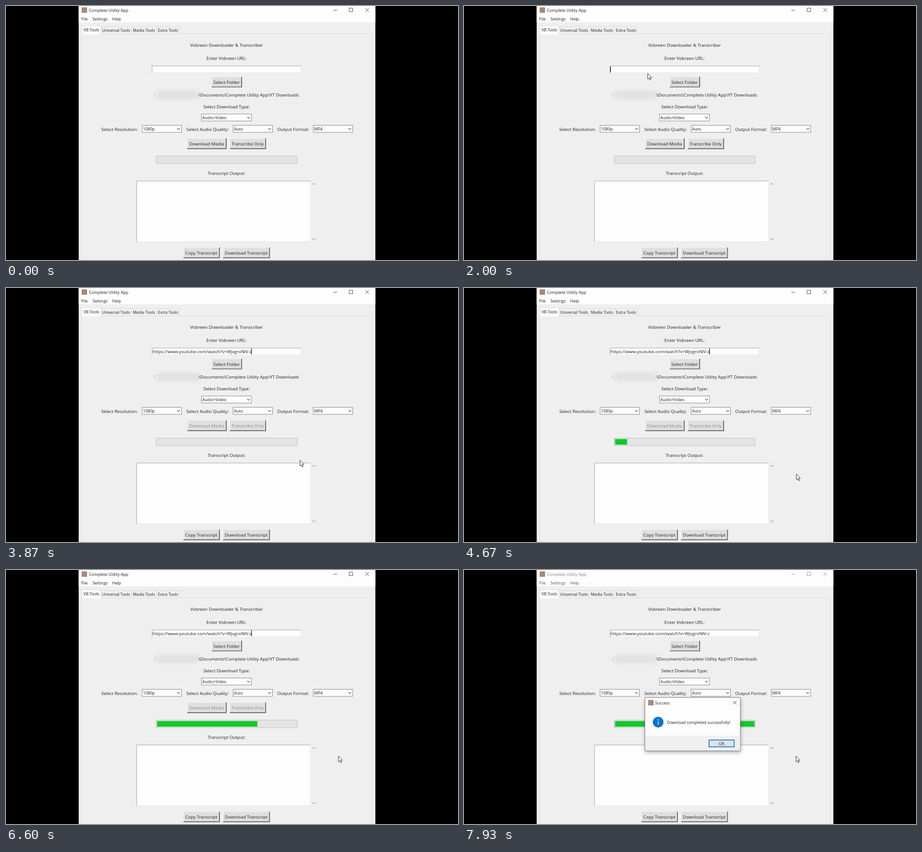
Animation of 998x561 px, one loop 8 s. Source, as an HTML page:

```html
<!DOCTYPE html>
<html lang="en">
<head>
<meta charset="utf-8">
<title>Complete Utility App</title>
<style>
html, body { margin: 0; width: 100%; height: 100%; overflow: hidden; background: #000; }
svg { display: block; width: 100%; height: 100%; }
text { font-family: "Open Sans", "Noto Sans", sans-serif; fill: #1e1e1e; white-space: pre; }
</style>
</head>
<body>
<svg id="stage" viewBox="0 0 998 561"></svg>
<script>
const LOOP = 8000;
const stage = document.getElementById('stage');

function add(parent, tag, attrs, content) {
  const el = document.createElementNS('http://www.w3.org/2000/svg', tag);
  for (const k in attrs) el.setAttribute(k, attrs[k]);
  if (content !== undefined) el.textContent = content;
  parent.appendChild(el);
  return el;
}
const group = (parent = stage) => add(parent, 'g', {});
const rect = (p, x, y, w, h, fill, more) =>
  add(p, 'rect', { x, y, width: w, height: h, fill, ...more });
const line = (p, d, stroke, width = 1, more) =>
  add(p, 'path', { d, stroke, 'stroke-width': width, fill: 'none', ...more });
const text = (p, x, y, size, str, more) =>
  add(p, 'text', { x, y, 'font-size': size, ...more }, str);
const label = (p, x, y, str, size = 9.8) =>
  text(p, x, y, size, str, { 'text-anchor': 'middle' });

function sunken(p, x, y, w, h) {
  rect(p, x, y, w, h, '#fdfdfd');
  line(p, `M${x + w - .5} ${y}V${y + h - .5}H${x}`, '#e6e6e6');
  line(p, `M${x + w} ${y + .5}H${x + .5}V${y + h}`, '#a2a2a6');
}

function button(p, x, y, w, str) {
  const h = 23.5;
  rect(p, x, y, w, h, '#dfdfe0');
  line(p, `M${x + w} ${y + .5}H${x + .5}V${y + h}`, '#f6f6f6');
  line(p, `M${x + w - 1.5} ${y + 1}V${y + h - 1.5}H${x + 1}`, '#9c9c9c');
  line(p, `M${x + w - .5} ${y}V${y + h - .5}H${x}`, '#4a4a4a', 1.2);
  return label(p, x + w / 2 - .5, y + 15.5, str);
}

function chevron(p, x, y, dir, color) {
  line(p, `M${x - 3} ${y - 1.5 * dir}L${x} ${y + 1.5 * dir}L${x + 3} ${y - 1.5 * dir}`, color, 1.1);
}

function combo(p, x, y, w, str) {
  rect(p, x + .5, y + .5, w - 1, 15.5, '#fdfdfd', { stroke: '#84848c' });
  text(p, x + 2.5, y + 11.7, 9, str);
  chevron(p, x + w - 7, y + 8.5, 1, '#555');
}

const cross = (p, x, y, r) =>
  line(p, `M${x - r} ${y - r}L${x + r} ${y + r}M${x + r} ${y - r}L${x - r} ${y + r}`, '#333', .9);
const appIcon = (p, x, y) => rect(p, x, y, 12, 12, '#a58a7c');

// Definitions
const defs = add(stage, 'defs', {});
function blur(id, dev) {
  const f = add(defs, 'filter', { id, x: '-30%', y: '-80%', width: '160%', height: '260%' });
  add(f, 'feGaussianBlur', { stdDeviation: dev });
}
blur('soft', 3.5);
blur('shade', 4.5);

// Window frame
rect(stage, 0, 0, 998, 561, '#000');
const win = group();
rect(win, 160.5, 0, 655, 561, '#efeff0');
rect(win, 160.5, 0, 655, 36, '#fdfdfd');
appIcon(win, 167, 3);
const bar = group(win);
text(bar, 183, 12.5, 9.1, 'Complete Utility App');
line(bar, 'M722.5 9.3H731', '#3a3a3a', .9);
rect(bar, 757.7, 4.7, 7.8, 7.8, 'none', { stroke: '#3a3a3a', 'stroke-width': .9 });
cross(bar, 797.5, 8.8, 4);
const menu = group(win);
[[166, 'File'], [191, 'Settings'], [234.5, 'Help']].forEach(([x, s]) => text(menu, x, 32, 9, s));

// Tabs
rect(win, 167.5, 61.5, 640, 520, 'none', { stroke: '#dcdcdf' });
[[209.5, 67, 'Universal Tools'], [276.5, 56, 'Media Tools'], [332.5, 50.5, 'Extra Tools']]
  .forEach(([x, w, s]) => {
    rect(win, x, 45.5, w, 16, '#f0f0f0', { stroke: '#d9d9dc' });
    label(win, x + w / 2, 57, s, 8.8);
  });
rect(win, 167.5, 43.5, 42, 18, '#fbfbfb', { stroke: '#dcdcdf' });
rect(win, 168, 60, 41, 3, '#fbfbfb');
label(win, 188.5, 55.5, 'VB Tools', 8.8);

// Form
label(win, 487, 89.7, 'Vobreen Downloader & Transcriber');
label(win, 487, 119.2, 'Enter Vobreen URL:');
sunken(win, 322, 132, 330, 16);
const url = text(win, 323.5, 143.8, 9.8, 'https://www.youtube.com/watch?v=WjvgroNlV-c');
const caret = rect(win, 0, 133.5, 1.3, 13, '#000');
button(win, 454, 156, 67, 'Select Folder');

text(win, 326.5, 200.3, 9.7, 'C', { style: 'fill:#a8a8a8' });
text(win, 422, 200.3, 9.7, 'a', { style: 'fill:#8a8a8a' });
rect(win, 333, 187, 93, 19, '#e2e2e3', { filter: 'url(#soft)' });
text(win, 647, 200.3, 9.8, '\\Documents\\Complete Utility App\\YT Downloads', { 'text-anchor': 'end' });

label(win, 487, 226.2, 'Select Download Type:');
combo(win, 431, 238, 111.5, 'Audio+Video');
label(win, 250.5, 275.7, 'Select Resolution:');
combo(win, 300, 263, 88, '1080p');
label(win, 445, 275.7, 'Select Audio Quality:');
combo(win, 501, 263, 88, 'Auto');
label(win, 634, 275.7, 'Output Format:');
combo(win, 678, 263, 88, 'MP4');
const actions = [
  button(win, 400, 292.3, 87, 'Download Media'),
  button(win, 494, 292.3, 80, 'Transcribe Only')
];
rect(win, 331.5, 331.5, 311.5, 16.5, '#e4e4e6', { stroke: '#bfbfc0' });
const fill = rect(win, 333.5, 333.7, 0, 12.3, '#13c82b');

label(win, 487, 373.4, 'Transcript Output:');
sunken(win, 288, 386, 384.5, 135);
chevron(win, 679.5, 393, -1, '#999');
chevron(win, 679.5, 515, 1, '#999');
button(win, 391.5, 533.3, 80.5, 'Copy Transcript');
button(win, 479, 533.3, 103.5, 'Download Transcript');

// Context menu
const popup = group();
rect(popup, 383, 142, 53.5, 18.5, '#7d7d7d', { opacity: .75 });
rect(popup, 380.5, 139.5, 54, 19, '#f2f2f2', { stroke: '#c4c4c4' });
text(popup, 396.5, 152.3, 8.8, 'Paste', { style: 'fill:#adadad' });

// Message box
const dialog = group();
rect(dialog, 400, 285, 211, 118, '#000', { filter: 'url(#shade)', opacity: .32 });
rect(dialog, 399.5, 281.5, 210.5, 118, '#fdfdfd', { stroke: '#77777b' });
rect(dialog, 400, 366, 209.5, 33, '#f0f0f0');
appIcon(dialog, 406.5, 287);
text(dialog, 422, 297, 8.9, 'Success');
cross(dialog, 598, 293, 3.8);
add(dialog, 'circle', { cx: 428.7, cy: 336, r: 11.8, fill: '#0b74c4' });
add(dialog, 'circle', { cx: 428.7, cy: 330.5, r: 1, fill: '#fff' });
line(dialog, 'M428.7 333.3V342', '#fff', 1.3);
text(dialog, 448, 340, 8.75, 'Download completed successfully!');
rect(dialog, 541, 375.5, 55.5, 15, '#e1e1e1', { stroke: '#0f78d0', 'stroke-width': 1.8 });
label(dialog, 568.7, 386.5, 'OK', 8.8);

// Pointer
const pointer = add(stage, 'path', {
  d: 'M0 0V12.6L2.9 10L4.9 14.7L6.9 13.9L4.9 9.3H8.8Z',
  fill: '#fff', stroke: '#111', 'stroke-width': .9
});

const path = [
  [200, 560, 575], [740, 378.5, 139], [1350, 378.5, 139], [1500, 390, 142],
  [1600, 390, 142], [1850, 405.7, 149], [2400, 405.7, 149], [2900, 436, 304],
  [3450, 436, 304], [4100, 734, 411], [7200, 734, 411], [7400, 733, 411]
];
const ease = u => u * u * (3 - 2 * u);

function pointerAt(t) {
  if (t <= path[0][0]) return path[0].slice(1);
  const i = path.findIndex(k => k[0] > t);
  if (i < 0) return path[path.length - 1].slice(1);
  const [t0, x0, y0] = path[i - 1], [t1, x1, y1] = path[i];
  const e = ease((t - t0) / (t1 - t0));
  return [x0 + (x1 - x0) * e, y0 + (y1 - y0) * e];
}

const FOCUS = 1535, PASTE = 2350, CLICK = 3400, START = 4408, DONE = 7600;
const show = (el, on) => el.setAttribute('visibility', on ? 'visible' : 'hidden');

function draw(t) {
  const done = t >= DONE;
  show(popup, t >= 800 && t < FOCUS);
  show(url, t >= PASTE);
  show(caret, t >= FOCUS && !done && (t - FOCUS) % 900 < 600);
  caret.setAttribute('x', t < PASTE ? 322.8 : 541.4);
  for (const a of actions) a.style.fill = t >= CLICK ? '#8c8c8c' : '';
  fill.setAttribute('width', Math.max(0, Math.min(308, (t - START) * .101)));
  show(dialog, done);
  bar.setAttribute('opacity', done ? .55 : 1);
  menu.setAttribute('opacity', done ? .75 : 1);
  const [x, y] = pointerAt(t);
  pointer.setAttribute('transform', `translate(${x} ${y})`);
}

const begin = performance.now();
function tick() {
  draw((performance.now() - begin) % LOOP);
  requestAnimationFrame(tick);
}
draw(0);
requestAnimationFrame(tick);
</script>
</body>
</html>
```
